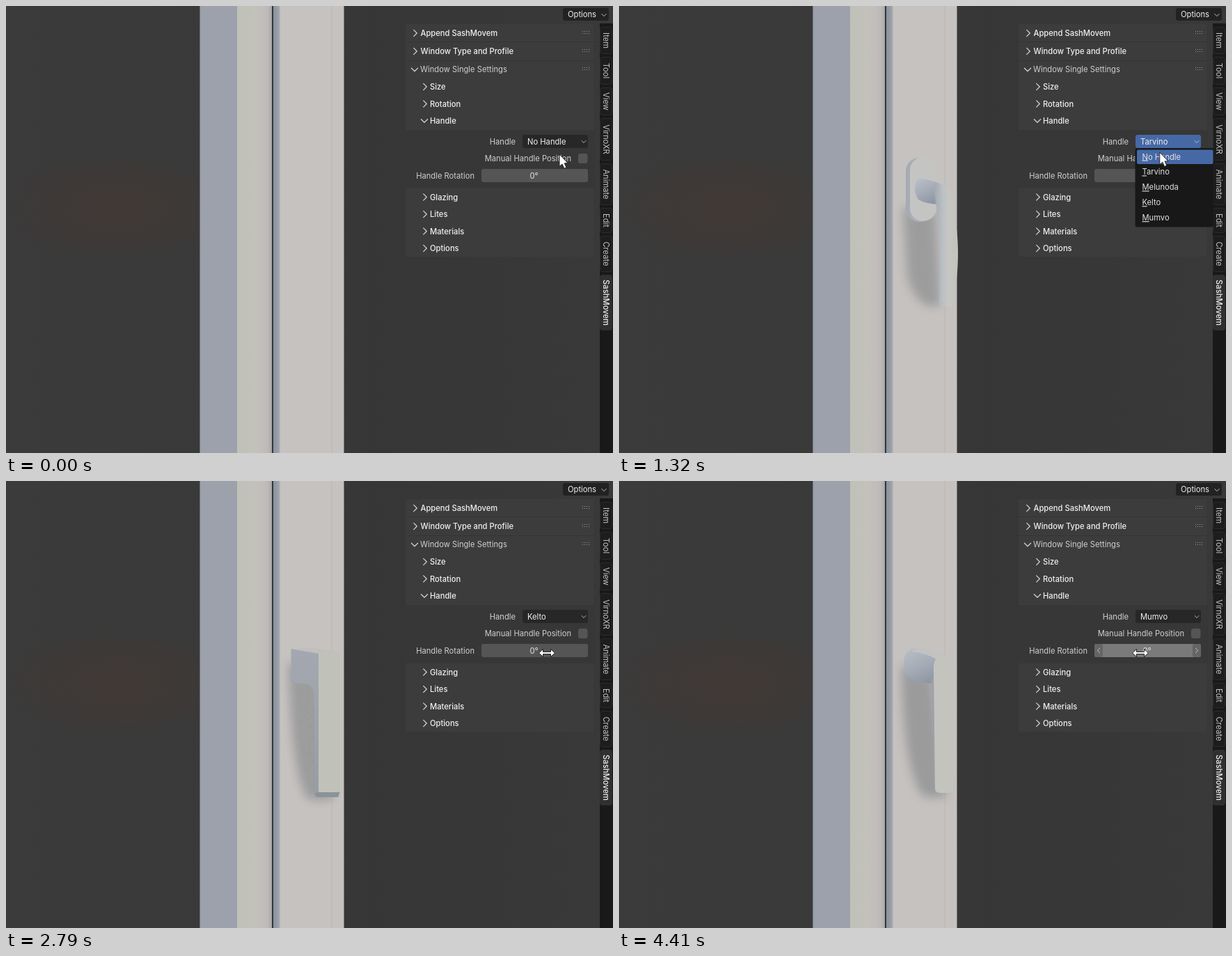
An HTML page that plays this animation: 872 px wide and 642 px high, repeating every 4440 ms.

```html
<!DOCTYPE html>
<html lang="en">
<head>
<meta charset="utf-8">
<title>Handle settings</title>
<style>
html, body { margin: 0; width: 100%; height: 100%; overflow: hidden; background: #3a3a3a; }
svg { display: block; width: 872px; height: 642px; }
text { font: 11.2px Inter, sans-serif; fill: #cfcfcf; white-space: pre; }
.hi { fill: #f0f0f0; font-weight: 500; }
.tab { fill: #c4c4c4; }
.key { text-decoration: underline; }
.chev { fill: none; stroke: #cfcfcf; stroke-width: 1.3; stroke-linecap: round; stroke-linejoin: round; }
</style>
</head>
<body>
<svg viewBox="0 0 872 642" xmlns="http://www.w3.org/2000/svg">
  <defs>
    <radialGradient id="warm">
      <stop offset="0" stop-color="#443935" stop-opacity=".75"/>
      <stop offset=".65" stop-color="#403936" stop-opacity=".5"/>
      <stop offset="1" stop-color="#3b3a39" stop-opacity="0"/>
    </radialGradient>
    <linearGradient id="back">
      <stop offset="0" stop-color="#3b3b3b"/>
      <stop offset=".55" stop-color="#383838"/>
      <stop offset=".6" stop-color="#363636"/>
      <stop offset="1" stop-color="#393939"/>
    </linearGradient>
    <linearGradient id="jamb">
      <stop offset="0" stop-color="#bfc1b8"/>
      <stop offset=".5" stop-color="#c2c1ba"/>
      <stop offset=".7" stop-color="#c2bebb"/>
      <stop offset=".88" stop-color="#bbb9b7"/>
      <stop offset="1" stop-color="#a1a3a4"/>
    </linearGradient>
    <linearGradient id="seal">
      <stop offset="0" stop-color="#8b929b"/>
      <stop offset=".65" stop-color="#9aa0a9"/>
      <stop offset="1" stop-color="#c3c0be"/>
    </linearGradient>
    <linearGradient id="plate">
      <stop offset="0" stop-color="#a4aab2"/>
      <stop offset="1" stop-color="#b9bdc1"/>
    </linearGradient>
    <linearGradient id="neck" x2=".5" y2="1">
      <stop offset="0" stop-color="#bbc0c6"/>
      <stop offset=".55" stop-color="#a5acb7"/>
      <stop offset="1" stop-color="#8f97a3"/>
    </linearGradient>
    <linearGradient id="grip">
      <stop offset="0" stop-color="#a3a9b3"/>
      <stop offset=".35" stop-color="#bcc0c3"/>
      <stop offset=".6" stop-color="#c6c6c3"/>
      <stop offset="1" stop-color="#c3c3bd"/>
    </linearGradient>
    <linearGradient id="slab" x2="0" y2="1">
      <stop offset="0" stop-color="#a3a8b0"/>
      <stop offset="1" stop-color="#969ca6"/>
    </linearGradient>
    <filter id="soft" x="-60%" y="-30%" width="220%" height="160%"><feGaussianBlur stdDeviation="7"/></filter>
    <filter id="edge" x="-10%" y="-10%" width="120%" height="120%"><feGaussianBlur stdDeviation=".5"/></filter>
    <clipPath id="sash"><rect x="393" y="0" width="92.500" height="642"/></clipPath>
  </defs>

  <rect width="872" height="642" fill="url(#back)"/>
  <svg width="278" height="642"><ellipse cx="160" cy="290" rx="185" ry="85" fill="url(#warm)"/></svg>

  <rect x="278.500" width="54" height="642" fill="#9ca1ab"/>
  <rect x="332" width="51" height="642" fill="url(#jamb)"/>
  <rect x="382" width="2" height="642" fill="#32373b"/>
  <rect x="384" width="11" height="642" fill="url(#seal)"/>
  <rect x="394" width="91.500" height="642" fill="#c6c2c0"/>
  <rect x="467.500" width="1" height="642" fill="#b8b5b3"/>

  <g class="handle" display="none">
    <g clip-path="url(#sash)">
      <path d="M408 290 L455 290 L462 430 Q430 440 414 390Z" fill="#60666b" opacity=".4" filter="url(#soft)"/>
      <path class="grain" fill="#777c82"/>
    </g>
    <g filter="url(#edge)">
      <rect x="412" y="218" width="40" height="92" rx="19" fill="url(#plate)"/>
      <rect x="418" y="217.500" width="38" height="91" rx="18" fill="#c4c5c3"/>
      <path d="M428 249 Q440 246 462 256 L460 285 Q440 284 430 278 Q421 264 428 249Z" fill="url(#neck)"/>
      <path d="M454 258 Q464 253 472 259 Q477 264 479 281 C484 305 487 330 487 355 C487 385 483 410 480 426 Q479 433 473 433 L465 433 Q460 433 460 426 C461 380 462 330 456 288 Q452 270 454 258Z" fill="url(#grip)"/>
    </g>
  </g>

  <g class="handle" display="none">
    <g clip-path="url(#sash)">
      <path d="M407 290 L450 290 L456 440 Q424 435 413 380Z" fill="#60666b" opacity=".4" filter="url(#soft)"/>
      <path class="grain" fill="#777c82"/>
    </g>
    <g filter="url(#edge)">
      <ellipse cx="433" cy="264" rx="21.500" ry="53" fill="url(#plate)"/>
      <ellipse cx="438" cy="263" rx="20" ry="52" fill="#c4c5c3"/>
      <path d="M430 250 Q440 244 460 247 L458 280 Q440 282 431 275 Q422 262 430 250Z" fill="url(#neck)"/>
      <path d="M446 252 Q464 243 473 256 C480 280 483 312 483 345 C483 385 478 415 473 436 Q469 446 460 446 Q448 445 448 433 C450 390 451 330 448 282 Q449 268 446 252Z" fill="url(#grip)"/>
    </g>
  </g>

  <g class="handle" display="none">
    <g clip-path="url(#sash)">
      <path d="M406 260 L446 270 L470 458 L435 458 Q410 430 406 260Z" fill="#60666b" opacity=".42" filter="url(#soft)"/>
      <path class="grain" fill="#777c82"/>
    </g>
    <g filter="url(#edge)">
      <path d="M409.500 241 L450 247 V453 L443 450 V308 Q442 294 432 292 L409.500 289Z" fill="url(#slab)"/>
      <path d="M410 241 L440 239.500 L479 245.500 L449 248Z" fill="#c0bfbd"/>
      <path d="M443 449 L449 446 H480 L477 454 H446Z" fill="#8b9199"/>
      <path d="M449 247 L480 246 V447 H449Z" fill="#c0c2b9"/>
    </g>
  </g>

  <g class="handle" display="none">
    <g clip-path="url(#sash)">
      <path d="M406 265 L450 280 L470 454 L438 454 Q408 420 406 265Z" fill="#60666b" opacity=".42" filter="url(#soft)"/>
      <path class="grain" fill="#777c82"/>
    </g>
    <g filter="url(#edge)">
      <path d="M409 262 Q409 241 427 240 L464 248 L462 293 L449 291 L425 287 Q409 282 409 262Z" fill="url(#neck)"/>
      <path d="M427 240 Q445 240 466 248 L456 256 Q440 247 420 245Z" fill="#c1c2c1"/>
      <path d="M449 285 L458 270 V447 Q453 446 453 439Z" fill="#9ba1aa"/>
      <path d="M452 272 Q451 252 464 249 Q480 252 480 275 V441 Q480 448 473 448 H461 Q454 448 454 441Z" fill="#c4c4be"/>
    </g>
  </g>

  <g id="ui"></g>

  <g id="menu" display="none">
    <rect x="741.500" y="204" width="112.500" height="113.500" rx="3" fill="#181818"/>
    <rect id="row" x="744" width="109.500" height="20.500" rx="2" fill="#4669a6"/>
    <g id="items"></g>
  </g>

  <g stroke="#222" stroke-width="1" stroke-linejoin="round" fill="#fff">
    <path id="arrow" d="M0 0V17.500L4 14L6.800 20.300L10 19L7.300 12.800H12.300Z"/>
    <path id="resize" d="M-11.500 0L-5.500 -5.500V-1.500H5.500V-5.500L11.500 0L5.500 5.500V1.500H-5.500V5.500Z"/>
  </g>
</svg>
<script>
const $ = id => document.getElementById(id);
const LOOP = 4440;
const names = ['No Handle', 'Tarvino', 'Melunoda', 'Kelto', 'Mumvo'];

// Static interface
const text = (x, y, s, attrs = '') => `<text x="${x}" y="${y + 4}" ${attrs}>${s}</text>`;
const box = (x, y, w, h, fill, attrs = '') =>
  `<rect x="${x}" y="${y}" width="${w}" height="${h}" fill="${fill}" ${attrs}/>`;
const chev = (x, y, turn = 0, size = 1) =>
  `<path class="chev" d="M-2.300 -4.600L2.300 0L-2.300 4.600" transform="translate(${x} ${y}) rotate(${turn}) scale(${size})"/>`;
const dots = y => [0, 1, 2, 3].map(i =>
  box(828 + i * 3, y - 3, 1, 1, '#999') + box(828 + i * 3, y, 1, 1, '#999')).join('');

let ui = box(800, 3, 66, 18, '#222', 'rx="3"') + text(807, 12, 'Options', 'class="hi" style="font-weight:400"') +
  chev(859, 13, 90, .7) +
  box(574, 26, 271.5, 334, '#3c3c3c', 'rx="3"') +
  box(574, 51, 271.5, 1, '#343434') + box(574, 78, 271.5, 1, '#343434') +
  box(574, 178, 271.5, 84, '#373737') +
  box(845, 26, 1, 334, '#363636');

[[39, 'Append SashMovem'], [65, 'Window Type and Profile']].forEach(([y, s]) => {
  ui += chev(588, y) + text(595.5, y, s, 'class="hi"') + dots(y);
});
ui += chev(587, 91.5, 90) + text(595, 91, 'Window Single Settings') + dots(91);
[[116, 'Size'], [140.5, 'Rotation'], [165, 'Handle'], [274.5, 'Glazing'],
 [299, 'Lites'], [323.5, 'Materials'], [348, 'Options']].forEach(([y, s]) => {
  ui += chev(s === 'Handle' ? 601 : 602, y, s === 'Handle' ? 90 : 0) + text(609, y, s, 'class="hi"');
});

ui += text(732, 194.5, 'Handle', 'text-anchor="end"') +
  box(742, 185, 94, 19, '#272727', 'id="drop" rx="3"') +
  text(749, 194.5, '', 'id="value" class="hi" style="font-weight:400"') + chev(830, 195, 90, .65) +
  text(812, 219, 'Manual Handle Position', 'text-anchor="end"') +
  box(822, 212, 13.5, 14, '#555', 'rx="3"') +
  text(673, 243.5, 'Handle Rotation', 'text-anchor="end"') +
  box(683, 234, 153, 19, '#555', 'id="slider" rx="3"') +
  `<g id="steps" display="none">${box(683, 234, 12, 19, '#656565', 'rx="3"')}${box(824, 234, 12, 19, '#656565', 'rx="3"')}` +
  chev(689, 243.5, 180, .7) + chev(830, 243.5, 0, .7) + '</g>' +
  text(758.5, 243.5, '0°', 'text-anchor="middle" style="fill:#e6e6e6"');

ui += box(853, 25, 19, 617, '#191919');
[['Item', 30, 69], ['Tool', 73, 113], ['View', 117, 157], ['VirnoXR', 161, 222], ['Animate', 226, 286],
 ['Edit', 290, 326], ['Create', 330, 382], ['SashMovem', 386, 466]].forEach(([s, top, end], i) => {
  const on = i === 7;
  ui += box(853.5, top + .5, 17, end - top - 1, on ? '#303030' : '#1d1d1d', `rx="3" stroke="${on ? '#303030' : '#2c2c2c'}"`) +
    `<text class="${on ? 'hi' : 'tab'}" text-anchor="middle" transform="translate(857.500 ${(top + end) / 2}) rotate(90)">${s}</text>`;
});
$('ui').innerHTML = ui;

const rowY = i => 216.5 + i * 21.9;
$('items').innerHTML = names.map((s, i) =>
  text(751.5, rowY(i), `<tspan class="key">${s[0]}</tspan>${s.slice(1)}`, 'style="fill:#e2e2e2"')).join('');

// Render grain inside each handle's shadow
let seed = 7;
const rnd = () => (seed = seed * 16807 % 2147483647) / 2147483647;
const grains = [...document.querySelectorAll('.grain')];
grains.forEach(g => {
  let d = '';
  for (let i = 0; i < 260; i++) {
    const y = 292 + rnd() * 148, x = 447 - rnd() * rnd() * 38;
    d += `M${x.toFixed(1)} ${y.toFixed(1)}h1v1h-1z`;
  }
  g.setAttribute('d', d);
});
const handles = [...document.querySelectorAll('.handle')];

// Timeline
const picks = [0, 570, 1740, 2670, 3600];
const opens = [210, 1020, 2130, 3060];
const track = [
  [0, 795, 213], [180, 779, 197], [300, 779, 197], [510, 777, 238], [570, 779, 239],
  [780, 783, 227], [990, 777, 197], [1200, 777, 197], [1600, 776, 257], [1740, 777, 257],
  [2100, 777, 197], [2280, 777, 197], [2520, 777, 279], [2670, 777, 279], [2790, 777, 247],
  [2970, 777, 197], [3180, 777, 198], [3510, 778, 304], [3750, 778, 305],
  [4260, 753, 253], [4410, 749, 247], [LOOP, 749, 247]
];

function pointer(t) {
  const i = track.findIndex(k => k[0] > t);
  const [t0, x0, y0] = track[i - 1], [t1, x1, y1] = track[i];
  const p = (t - t0) / (t1 - t0), e = p * p * (3 - 2 * p);
  return [x0 + (x1 - x0) * e, y0 + (y1 - y0) * e];
}
const show = (el, on) => el.setAttribute('display', on ? 'inline' : 'none');

function draw(t) {
  const [x, y] = pointer(t);
  const pick = picks.filter(p => p <= t).length - 1;
  const open = pick < 4 && t >= opens[pick];
  const hover = t >= 4290;

  handles.forEach((h, i) => show(h, i === pick - 1));
  if (pick) {
    const age = t - picks[pick];
    grains[pick - 1].setAttribute('opacity', Math.max(0, .7 - age / 260));
    handles[pick - 1].setAttribute('opacity', Math.min(1, .85 + age / 1000));
  }

  $('value').textContent = names[pick];
  $('drop').setAttribute('fill', open ? '#4669a6' : '#272727');
  show($('menu'), open);
  const row = y < 206 ? pick : Math.min(4, Math.floor((y - 205.5) / 21.9));
  $('row').setAttribute('y', rowY(row) - 6.5 - 3.5);

  $('slider').setAttribute('fill', hover ? '#7a7a7a' : '#555');
  show($('steps'), hover);

  const sizing = !open && y >= 234 && y <= 253;
  show($('arrow'), !sizing);
  show($('resize'), sizing);
  $(sizing ? 'resize' : 'arrow').setAttribute('transform', `translate(${x.toFixed(2)} ${y.toFixed(2)})`);
}

const start = performance.now();
(function tick() {
  draw((performance.now() - start) % LOOP);
  requestAnimationFrame(tick);
})();
</script>
</body>
</html>
```
